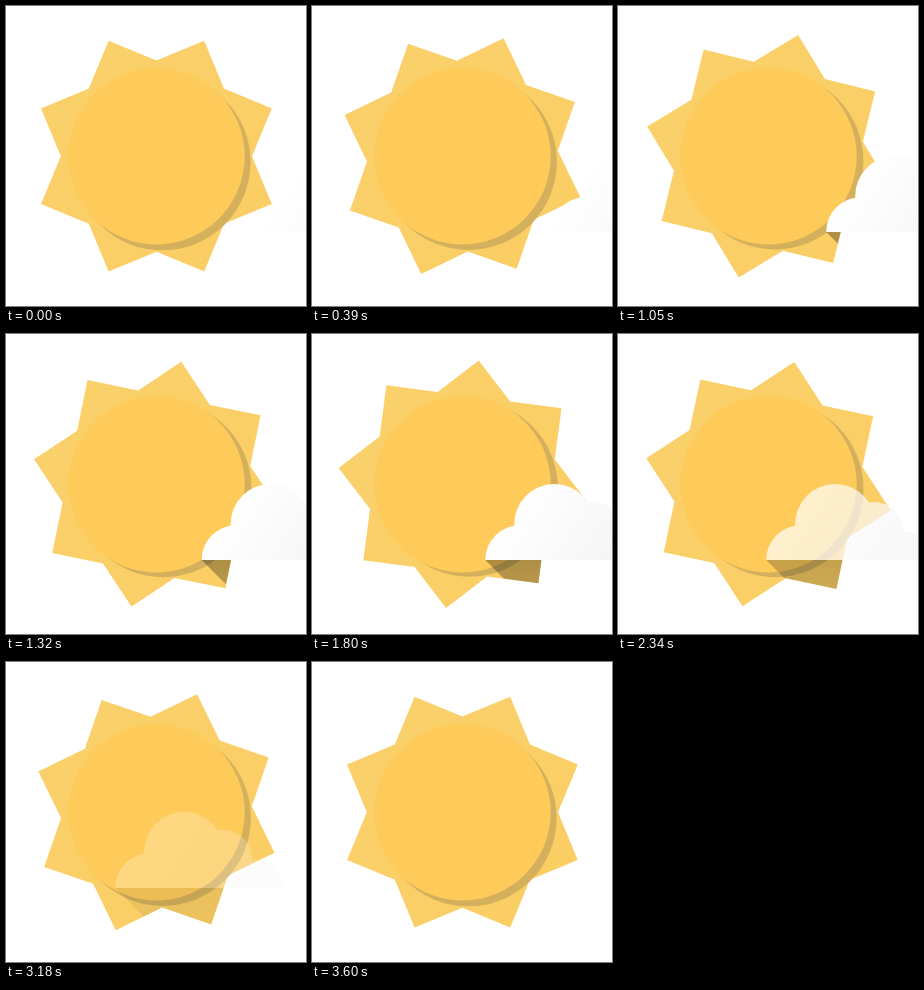
An HTML page with a canvas that plays this animation: 300x300 px, repeating every 3630 ms.

```html
<!DOCTYPE html>
<html lang="en">
<head>
<meta charset="utf-8">
<title>Sun and cloud</title>
<style>
  html, body { margin: 0; width: 100%; height: 100%; overflow: hidden; background: #fff; }
  canvas { display: block; width: 300px; height: 300px; }
</style>
</head>
<body>
<canvas id="stage" width="300" height="300"></canvas>
<script>
const ctx = document.getElementById('stage').getContext('2d');
const LOOP = 3630, STEP = 30, HALF = 1800;
const SUN = { x: 150.4, y: 150.2, r: 88.3 };
const BASE = 226, CLOUD_WIDTH = 169;

// Bumps measured from the cloud's lower left corner: x, y, radius.
const BUMPS = [[35, 0, 35], [69, -36, 40], [108, -29, 29], [140.5, 0, 28]];

function gradient(x0, y0, x1, y1, from, to) {
  const g = ctx.createLinearGradient(x0, y0, x1, y1);
  g.addColorStop(0, from);
  g.addColorStop(1, to);
  return g;
}

function disc(x, y, r, fill) {
  ctx.beginPath();
  ctx.arc(x, y, r, 0, Math.PI * 2);
  ctx.fillStyle = fill;
  ctx.fill();
}

// Outline of two crossed squares.
function starPath(angle) {
  const path = new Path2D();
  const inner = SUN.r / Math.cos(Math.PI / 8);
  const outer = SUN.r * Math.SQRT2;
  for (let i = 0; i < 16; i++) {
    const a = angle + i * Math.PI / 8;
    const r = i % 2 ? outer : inner;
    path.lineTo(SUN.x + r * Math.cos(a), SUN.y + r * Math.sin(a));
  }
  path.closePath();
  return path;
}

function drawSun(star, angle) {
  const a = angle + Math.PI / 4;
  const dx = Math.cos(a), dy = Math.sin(a);
  ctx.fillStyle = gradient(
    SUN.x - 110 * dx, SUN.y - 110 * dy, SUN.x + 110 * dx, SUN.y + 110 * dy,
    '#fad06b', '#fbce64');
  ctx.fill(star);
  disc(SUN.x + 8.3 * dx, SUN.y + 8.3 * dy, SUN.r, '#d4b05c');
  disc(SUN.x, SUN.y, SUN.r, '#fecb5a');
}

function drawCloudShadow(star, left) {
  ctx.save();
  ctx.clip(star);
  ctx.beginPath();
  ctx.moveTo(left, BASE);
  ctx.lineTo(left + CLOUD_WIDTH, BASE);
  ctx.lineTo(left + CLOUD_WIDTH + 80, BASE + 80);
  ctx.lineTo(left + 80, BASE + 80);
  ctx.fillStyle = gradient(0, BASE, 0, BASE + 40, 'rgba(0,0,0,.31)', 'rgba(0,0,0,.24)');
  ctx.fill();
  ctx.restore();
}

function drawCloud(left) {
  ctx.beginPath();
  for (const [x, y, r] of BUMPS) {
    ctx.moveTo(left + x + r, BASE + y);
    ctx.arc(left + x, BASE + y, r, 0, Math.PI * 2);
  }
  ctx.rect(left + 35, BASE - 20, 105, 20);
  ctx.save();
  const body = new Path2D();
  body.rect(0, 0, 300, BASE);
  ctx.fillStyle = gradient(left + 35, BASE - 60, left + 125, BASE, '#ffffff', '#f5f5f5');
  const clipped = new Path2D();
  for (const [x, y, r] of BUMPS) {
    clipped.moveTo(left + x + r, BASE + y);
    clipped.arc(left + x, BASE + y, r, 0, Math.PI * 2);
  }
  clipped.rect(left + 35, BASE - 20, 105, 20);
  ctx.clip(body);
  ctx.fill(clipped);
  ctx.restore();
}

function draw(t) {
  const swing = 1 - Math.abs(t - HALF) / HALF;
  const angle = -15 * Math.max(0, swing) * Math.PI / 180;
  const left = 257 - 0.0465 * t;
  const star = starPath(angle);

  ctx.globalAlpha = 1;
  ctx.fillStyle = '#fff';
  ctx.fillRect(0, 0, 300, 300);
  drawSun(star, angle);

  ctx.globalAlpha = Math.max(0, Math.min(1, 2 - t / HALF));
  drawCloudShadow(star, left);
  drawCloud(left);
}

const start = performance.now();
function tick() {
  const t = (performance.now() - start) % LOOP;
  draw(Math.floor(t / STEP) * STEP);
  requestAnimationFrame(tick);
}
tick();
</script>
</body>
</html>
```
